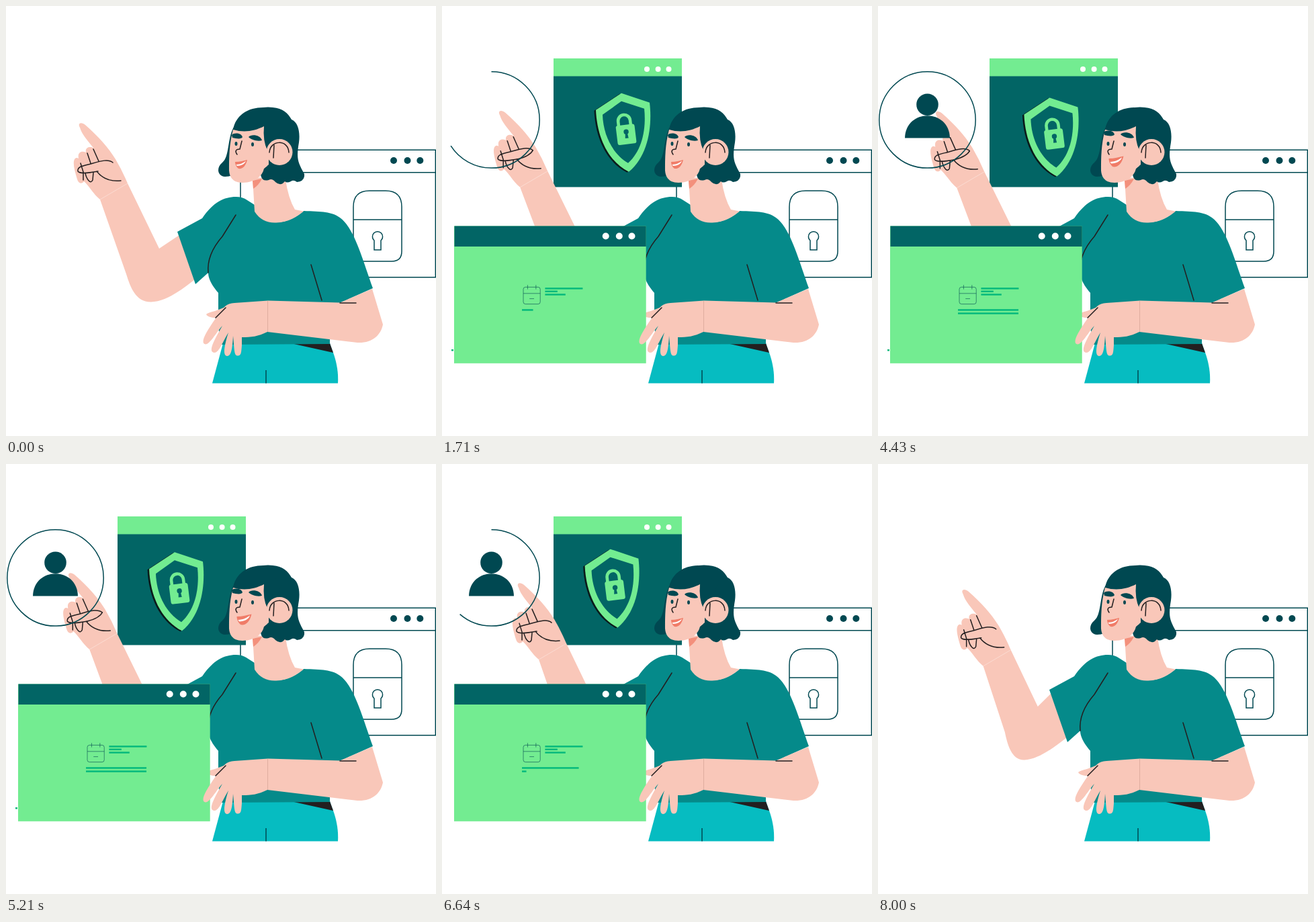
These frames come from a looping animation (640 px wide and 640 px high, 8.71 s). An HTML page:

```html
<!DOCTYPE html>
<html lang="en">
<head>
<meta charset="utf-8">
<title>Data security</title>
<style>
html, body { margin: 0; width: 100%; height: 100%; overflow: hidden; background: #fff; }
svg { display: block; width: 100vw; height: 100vh; }
.line { fill: none; stroke: #004851; stroke-width: 1.5; }
.ink { fill: none; stroke: #231f20; stroke-width: 1.5; stroke-linecap: round; stroke-linejoin: round; }
.skin { fill: #f9c7b9; }
.hair { fill: #004851; }
.deep { fill: #026565; }
.lime { fill: #73ec91; }
.bar { fill: #00b87c; }
.white { fill: #fff; }
</style>
</head>
<body>
<svg viewBox="0 0 640 640">
  <!-- outlined window with padlock -->
  <path class="line" d="M349 214.3H639.3V403.8H349ZM349 247.7H639.3"/>
  <g class="hair"><circle cx="577" cy="230" r="5"/><circle cx="597.5" cy="230" r="5"/><circle cx="616.3" cy="230" r="5"/></g>
  <path class="line" d="M517 299Q517 275 541 275H565Q589 275 589 299V365Q589 380 574 380H532Q517 380 517 365ZM517 318H589"/>
  <path class="line" d="M548 363V349A7.6 7.6 0 1 1 558 349V363Z"/>

  <!-- shield window -->
  <g id="shieldWindow">
    <rect class="deep" x="166" y="78" width="191" height="191.5"/>
    <rect class="lime" x="166" y="78" width="191" height="26.5"/>
  </g>
  <g class="white"><circle cx="305" cy="94" r="4"/><circle cx="321.6" cy="94" r="4"/><circle cx="337.5" cy="94" r="4"/></g>
  <g id="shield">
    <path id="shieldShape" fill="#0b1a1a" transform="translate(-2.5 1)" d="M267 130L309 144C313 177 308 222 278 247C250 233 231 200 229 155Z"/>
    <path class="lime" d="M267 130L309 144C313 177 308 222 278 247C250 233 231 200 229 155Z"/>
    <path class="deep" d="M267 142L301 153C304 181 299 214 277 234C255 221 240 194 239 162Z"/>
    <g transform="rotate(-7 274 191)">
      <path d="M264.500 180V171A9 9 0 0 1 282.500 171V180" fill="none" stroke="#73ec91" stroke-width="4.600"/>
      <rect class="lime" x="260" y="177" width="28" height="29" rx="3"/>
      <circle class="deep" cx="274.500" cy="187.500" r="3.700"/>
      <path class="deep" d="M273 189H276L277 197H272Z"/>
    </g>
  </g>

  <!-- pointing arm -->
  <path id="forearm" class="skin"/>
  <g id="hand">
    <path class="skin" d="M110 181C106 174 112 172 118 177C138 195 152 210 163 228Q173 245 181 264L140 288C130 280 124 268 116 261C113 265 108 265 106 258C103 248 100 238 101 231C102 226 105 225 108 227C106 217 113 215 119 218C117 210 126 208 131 212C121 200 113 191 110 181Z"/>
    <path d="M140 288L181 264" stroke="#fbd9cf" fill="none"/>
    <path class="ink" d="M130 213L138 231M121 219L126 234M111 234L115 247V259M118 249C120 258 126 266 129 259L130 248M159 233C152 227 140 231 126 235C114 238 106 239 107 246C110 250 120 249 137 246M135 246C142 255 152 262 171 260"/>
    <path id="thumbClose" class="ink" d="M137 246C148 243 156 239 159 233"/>
  </g>

  <!-- body -->
  <path fill="#06bcc1" d="M323 502L307 561.500H494C495 545 492 530 487 516L482 502Z"/>
  <path fill="#231f20" d="M424 502H482L487 516Z"/>
  <path class="line" d="M387 542V561.500"/>
  <path fill="#058a8a" d="M255 336L292 316C308 292 325 284 342 284Q352 284 359 289L370 296C372 314 385 322 402 322C420 322 434 313 443 305C470 306 485 306 497 315C518 330 530 375 546 420L497 442L482 470V503L320 504L316 478V427C303 412 301 402 301 397L282 414Z"/>
  <path class="ink" d="M342 311L322 343C308 359 299 376 301 397M454 385L470 438"/>
  <path class="skin" d="M298 459C302 455 318 454 335 443L325 462C315 465 301 465 298 459Z"/>

  <!-- neck and head -->
  <path class="skin" d="M367 255L370 306C378 318 388 323 402 322.500C420 322 434 313 443 305.500L430 303Q420 286 416 258Z"/>
  <path fill="#f3907c" d="M367 260L381 257Q376 267 368 272Z"/>
  <path class="hair" d="M339 180C344 162 360 151 383 151Q390 150 397 151C412 152 420 160 425 169C435 173 438 188 436 203C432 227 434 232 444 250Q445 261 433 262Q428 258 424 261Q418 264 415 261Q409 269 401 262Q396 256 391 259Q380 262 379 250Q381 242 389 238L345 245Q338 254 326 254C314 253 313 240 322 233C333 224 329 198 339 180Z"/>
  <path class="skin" d="M338 184C332 206 332 226 332 245C333 258 341 263 352 263C366 263 381 256 384 242L391 236V212L385 177Z"/>
  <g id="brows" class="hair">
    <path d="M336 192C340 188 350 189 352 195C350 199 342 197 337 196Z"/>
    <path d="M361 195C365 190 379 192 381 200C374 202 365 199 361 195Z"/>
  </g>
  <path class="hair" d="M338 184C342 164 358 152 386 152L410 180L400 205L389 215Q382 200 384 179C370 186 355 189 338 184Z"/>
  <circle class="skin" cx="407" cy="217.500" r="19.500"/>
  <path class="ink" d="M392 218C393 199 420 198 421 218M399 207L398 226M351 201L348 213C341 213 341 217 344 221"/>
  <g class="hair"><ellipse cx="342.500" cy="205" rx="2" ry="3"/><ellipse cx="367" cy="206" rx="2" ry="3"/></g>
  <g id="mouth">
    <path fill="#f07c68" d="M341 232C348 232 354 230 359 229C357 238 352 243 346 242C343 240 341 236 341 232Z"/>
    <path class="white" d="M342.500 236C349 236 354 233 357 230.500C356 235 350 238 344 238Z"/>
  </g>

  <!-- calendar window -->
  <rect id="dash" class="bar" x="14" y="511" width="3" height="2.500"/>
  <g id="calendarWindow">
    <rect class="lime" x="18" y="327.500" width="285.700" height="204.300"/>
    <rect class="deep" x="18.500" y="327.500" width="285.200" height="30.500"/>
    <g class="white"><circle cx="243.700" cy="342.500" r="5"/><circle cx="263.800" cy="342.500" r="5"/><circle cx="282.500" cy="342.500" r="5"/></g>
    <g id="calendar">
      <rect class="line" x="57" y="394" width="63" height="63" rx="8"/>
      <path class="line" d="M57 417.500H120M73 386V402M104 386V402M80 437H97"/>
      <g id="bars" class="bar"></g>
    </g>
  </g>

  <!-- resting arm -->
  <path class="skin" d="M545 421L561 474C558 490 545 502 523 501L389 485C375 492 365 493 351 493V505C350 517 350 520 345 520.500C339 521 340 510 338 491C337 507 336 521 329 521C322 520 325 505 331 486C322 501 317 516 310 516C301 515 307 502 322 476C312 487 304 503 297 503.500C289 502 295 489 312 465L326 447Q331 442.500 340 442L390 438.500L497 441.500Z"/>
  <path d="M389.500 439V485" fill="none" stroke="#d9a699" stroke-width=".8"/>
  <path class="ink" d="M312 464L327 449M497 442H521"/>

  <!-- profile badge -->
  <g id="person" class="hair"><circle cx="73.500" cy="146.700" r="16.300"/><path d="M40 196.500C41 152 106 152 107 196.500Z"/></g>
  <path id="ring" class="line" pathLength="1" d="M73.500 97.700A71.700 71.700 0 0 1 73.500 241.100A71.700 71.700 0 0 1 73.500 97.700"/>
</svg>
<script>
const LOOP = 8710, FPS = 14, SWITCH = 7060;
const HOLDS = [[290, 570], [570, 790], [1140, 1290], [1360, 1500]];
const el = id => document.getElementById(id);
const ease = (t, from, to) => {
  const p = Math.min(1, Math.max(0, (t - from) / (to - from)));
  return p * p * (3 - 2 * p);
};
const pulse = (t, a, b, c, d) => ease(t, a, b) - ease(t, c, d);
const show = (id, on) => el(id).setAttribute('visibility', on ? 'inherit' : 'hidden');
const move = (id, x, y) => el(id).setAttribute('transform', `translate(${x} ${y})`);

function scaleAt(id, s, cx, cy, dx = 0, dy = 0) {
  show(id, s > 0.004);
  el(id).setAttribute('transform', `translate(${cx + dx} ${cy + dy}) scale(${s}) translate(${-cx} ${-cy})`);
}

// x, y, width, then the times of growing and shrinking
const bars = [
  [138, 399, 140, 700, 1020, 7250, 7600],
  [138, 410, 46, 850, 1150, 7150, 7450],
  [138, 421.700, 76, 1050, 1450, 6850, 7430],
  [52, 479, 225, 1550, 2150, 6550, 7170],
  [52, 491.700, 225, 1900, 2500, 6100, 6750]
].map(([x, y, width, ...times]) => {
  const node = document.createElementNS('http://www.w3.org/2000/svg', 'rect');
  node.setAttribute('x', x);
  node.setAttribute('y', y - 3);
  node.setAttribute('height', 6);
  el('bars').append(node);
  return { node, width, times };
});

function drawArm(reach) {
  const x = 17 * reach, y = 13 * reach, e = 10 * reach;
  move('hand', x, y);
  show('thumbClose', reach < -0.9);
  el('forearm').setAttribute('d', `M${140 + x} ${288 + y}L${179 + e} ${399}
    C${185 + e * 0.8} 418 ${193 + e * 0.6} 441 ${216 + e * 0.2} 440.500C238 440 262 422 281 407
    L258 341L${228 + e} 361L${181 + x} ${264 + y}Z`);
}

function draw(t) {
  scaleAt('shieldWindow', t < SWITCH ? ease(t, -20, 1090) : 1 - ease(t, 6892, 7994), 272.500, 177);
  scaleAt('calendarWindow', pulse(t, -20, 590, 7090, 7680), 163.700, 434.700);
  scaleAt('calendar', t < SWITCH ? 0.4 : 1, 163.700, 434.700);
  for (const { node, width, times } of bars) node.setAttribute('width', width * pulse(t, ...times));
  show('dash', t >= 560 && t < 5600);

  const drift = -16.500 * ease(t, 2480, 5530);
  const bob = -0.6 + 8.800 * ease(t, 1400, 3850) - 11.700 * ease(t, 3850, 6300);
  scaleAt('shield', pulse(t, 800, 1600, 6620, 7420), 266.200, 196.800, drift, bob);

  drawArm(-1.4 * ease(t, 0, 1560) + 2.4 * ease(t, 4007, 8229));

  move('brows', 0, -4 * pulse(t, 1700, 2800, 6000, 6950));
  const smile = pulse(t, 1700, 2800, 5250, 6050);
  scaleAt('mouth', 1 + 0.22 * smile, 350, 236, 4.500 * smile, -4 * smile);

  scaleAt('person', pulse(t, 1800, 2700, 7200, 7850), 73.500, 164);
  const arc = pulse(t, 605, 2430, 5880, 7680);
  show('ring', arc > 0.001);
  el('ring').setAttribute('stroke-dasharray', arc > 0.999 ? 'none' : `${arc} 2`);
}

function frame(now) {
  const time = now % LOOP;
  const hold = HOLDS.find(([from, to]) => time >= from && time < to);
  const stepped = Math.floor((time + 8) * FPS / 1000) * 1000 / FPS;
  draw(Math.min(8000, hold ? hold[0] : stepped));
  requestAnimationFrame(frame);
}
const start = performance.now();
const tick = () => frame(performance.now() - start);
draw(0);
requestAnimationFrame(function loop() {
  const time = (performance.now() - start) % LOOP;
  const hold = HOLDS.find(([from, to]) => time >= from && time < to);
  draw(Math.min(8000, hold ? hold[0] : Math.floor((time + 8) * FPS / 1000) * 1000 / FPS));
  requestAnimationFrame(loop);
});
</script>
</body>
</html>
```
